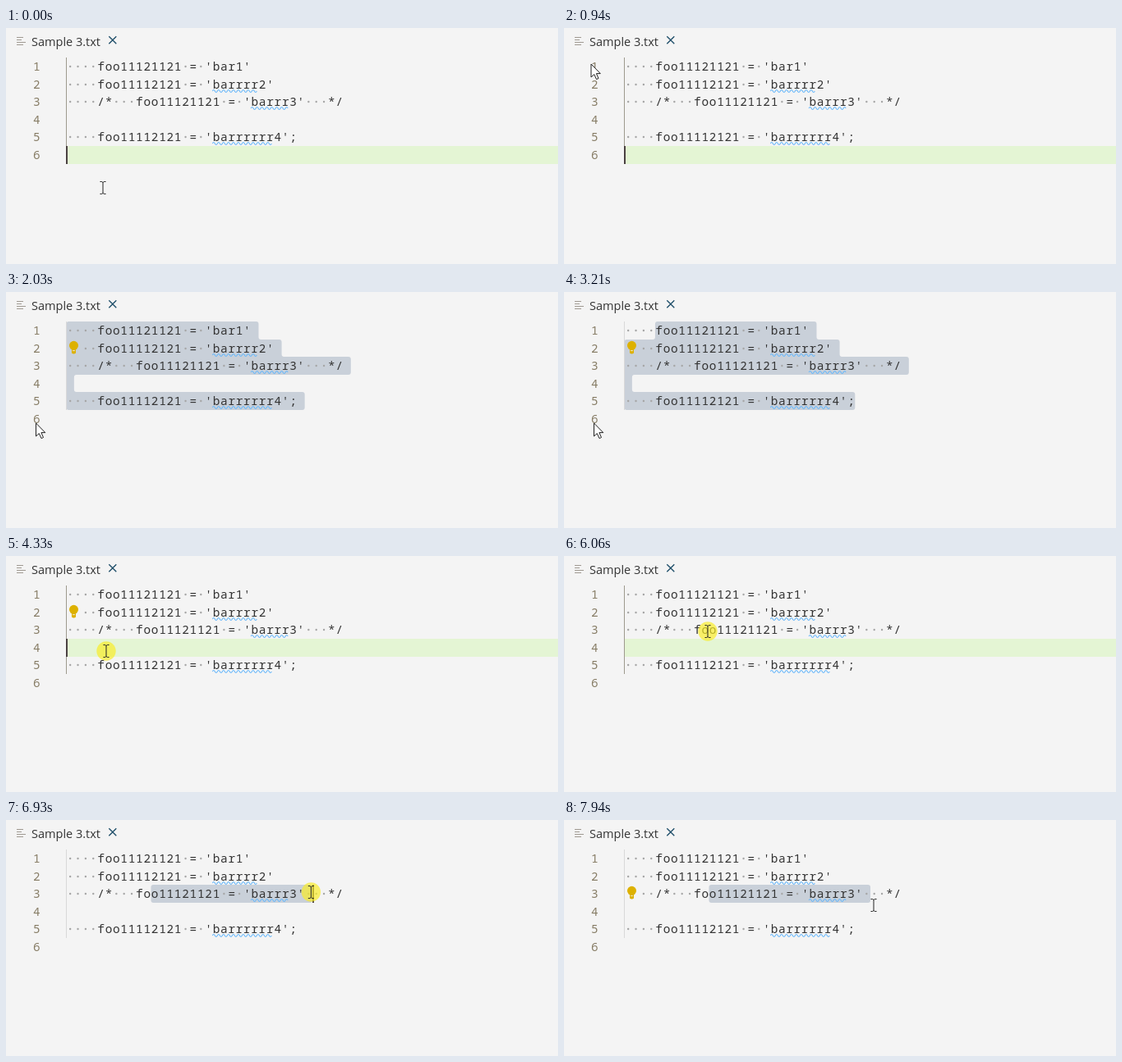
Animation, 672 px wide and 288 px high, one loop 8 s. Source, as an HTML page:

```html
<!DOCTYPE html>
<html lang="en">
<head>
<meta charset="utf-8">
<title>Editor selection</title>
<style>
  html, body { margin: 0; width: 100%; height: 100%; overflow: hidden; background: #f4f4f4; }
  svg { display: block; width: 672px; height: 288px; }
  .code { font: 14.4px "Noto Sans Mono", "DejaVu Sans Mono", monospace; letter-spacing: .72px; fill: #333; }
  .num { fill: #877d66; }
  .tab { font: 14.5px "Open Sans", "Noto Sans", sans-serif; fill: #333; }
  .dot { fill: #a6a6a6; }
  .wave { fill: none; stroke: #6cb9fa; stroke-width: 1.2; }
  .bulb { fill: #ddb100; }
</style>
</head>
<body>
<svg id="stage" viewBox="0 0 672 288">
  <path d="M13 11.5h8M13 14.5h6M13 17.5h11M13 20.5h8" stroke="#a09a92" fill="none"/>
  <text class="tab" x="31" y="22">Sample 3.txt</text>
  <path d="M125.3 10.3l9 9m0-9l-9 9" stroke="#1d4d68" stroke-width="1.3" fill="none"/>
  <rect id="active" x="73" width="599" height="22" fill="#e4f5d4"/>
  <path id="matches" fill="#e6eaed"/>
  <path id="selection" fill="#c9d0d9"/>
  <path id="guide" d="M73.5 36V144" fill="none"/>
  <g id="text"></g>
  <g id="bulb" class="bulb">
    <circle cx="82.5" cy="7.3" r="5.5"/>
    <path d="M80 11h5v5.5q-2.5 2-5 0z"/>
    <path d="M81 13.6h3" stroke="#f4f4f4" stroke-width=".8"/>
  </g>
  <rect id="caret" width="2" height="22" fill="#4a4042"/>
  <circle id="halo" r="11.7" fill="#f9ec24" fill-opacity=".68"/>
  <path id="arrow" d="M0 0V16L3.8 12.6L6.5 18.6L9 17.5L6.4 11.6H11.3Z"
        fill="#fff" stroke="#222" stroke-linejoin="round"/>
  <path id="beam" d="M-3.5 -7.5H-1.5L0 -6.5L1.5 -7.5H3.5M0 -6.5V6.5M-3.5 7.5H-1.5L0 6.5L1.5 7.5H3.5"
        fill="none" stroke="#222"/>
</svg>
<script>
const LOOP = 8000, X0 = 73.5, Y0 = 36, CW = 9.36, LH = 21.6;
const lines = [
  "    foo11121121 = 'bar1'",
  "    foo11112121 = 'barrrr2'",
  "    /*   foo11121121 = 'barrr3'   */",
  "",
  "    foo11112121 = 'barrrrrr4';",
  ""
];

// mouse moves: start, end, x, y, ease-out power
const moves = [
  [440, 940, 33, 44],
  [1190, 1340, 31.5, 133],
  [1490, 1810, 35, 148],
  [1930, 2030, 36.5, 160],
  [3720, 4260, 122, 116],
  [4540, 4970, 167, 112],
  [5080, 5360, 166, 90],
  [5560, 6000, 175, 92],
  [6225, 7400, 374, 88, 4.7],
  [7900, 7940, 377, 104]
];
const presses = [[1190, 1490], [4260, 4400], [6050, 7710]];
const bulbs = [[1720, 4570, 1], [7390, LOOP, 2]];   // from, to, row

const $ = id => document.getElementById(id);
const colX = c => X0 + c * CW;
const rowY = r => Math.round(Y0 + r * LH);
const during = (list, t) => list.find(([a, b]) => t >= a && t < b);
const show = (el, on) => el.setAttribute("visibility", on ? "visible" : "hidden");
const place = (el, x, y) => el.setAttribute("transform", `translate(${x} ${y})`);

function add(tag, attrs, content = "") {
  const el = document.createElementNS("http://www.w3.org/2000/svg", tag);
  for (const k in attrs) el.setAttribute(k, attrs[k]);
  el.textContent = content;
  $("text").append(el);
  return el;
}

function wave(from, to, y) {
  let d = `M${from} ${y}q1.5 -3 3 0`;
  for (let x = from + 6; x <= to; x += 3) d += "t3 0";
  add("path", { class: "wave", d });
}

const edgeDots = [];   // dots the light bulb covers, by row
lines.forEach((line, r) => {
  const y = rowY(r);
  add("text", { class: "code num", x: 33, y: y + 16 }, r + 1);
  for (const m of line.matchAll(/\S+/g))
    add("text", { class: "code", x: colX(m.index) + .36, y: y + 16 }, m[0]);
  const dots = [...line.matchAll(/ /g)].map(m =>
    add("circle", { class: "dot", cx: colX(m.index + .5), cy: y + 11, r: 1.2 }));
  edgeDots[r] = dots.slice(0, 2);
  const typo = /barr+/.exec(line);
  if (typo) wave(colX(typo.index), colX(typo.index + typo[0].length), y + 19);
});

function mouse(t) {
  let x = 118, y = 195;
  for (const [start, end, u, v, power = 2] of moves) {
    if (t < start) break;
    const k = 1 - (1 - Math.min(1, (t - start) / (end - start))) ** power;
    x += (u - x) * k;
    y += (v - y) * k;
  }
  return [x, y];
}

// caret and selection anchor as [row, column], and when the caret began to blink
function edit(t) {
  if (t < 1190) return { caret: [5, 0], since: -190 };
  if (t < 2750) {
    const y = mouse(Math.min(t, 1420))[1];
    return { anchor: [0, 0], caret: [Math.floor((y - Y0) / LH) + 1, 0], since: 1320 };
  }
  if (t < 4260) return { anchor: [0, 4], caret: [4, 30], since: 2710 };
  if (t < 6130) return { caret: [3, 0], since: 4260 };
  const col = Math.max(11, Math.round((mouse(t - 60)[0] - X0) / CW));
  return { anchor: col > 11 ? [2, 11] : null, caret: [2, col], since: 7250 };
}

// closed outline of stacked rows [left, right, row] with rounded corners
function outline(rows) {
  const right = [], left = [];
  for (const [l, r, row] of rows) {
    right.push([r, rowY(row)], [r, rowY(row + 1)]);
    left.unshift([l, rowY(row + 1)], [l, rowY(row)]);
  }
  const pts = [...right, ...left].filter((p, i, all) =>
    !i || p[0] !== all[i - 1][0] || p[1] !== all[i - 1][1]);
  const toward = (p, q) => {
    const len = Math.hypot(q[0] - p[0], q[1] - p[1]), k = Math.min(3, len / 2) / len;
    return `${p[0] + (q[0] - p[0]) * k} ${p[1] + (q[1] - p[1]) * k}`;
  };
  const n = pts.length;
  return pts.map((p, i) =>
    `${i ? "L" : "M"}${toward(p, pts[(i + n - 1) % n])}Q${p[0]} ${p[1]} ${toward(p, pts[(i + 1) % n])}`
  ).join("") + "Z";
}

function selectionPath([r0, c0], [r1, c1]) {
  const rows = [];
  for (let r = r0; r <= r1; r++) {
    const from = r === r0 ? c0 : 0, to = r === r1 ? c1 : lines[r].length + 1;
    if (to > from) rows.push([colX(from), colX(to), r]);
  }
  return outline(rows);
}

function matchPath([row, from], [, to]) {
  const word = lines[row].slice(from, to);
  return lines.map((line, r) => {
    const c = r === row ? -1 : line.indexOf(word);
    return c < 0 ? "" : outline([[colX(c), colX(c + word.length), r]]);
  }).join("");
}

function draw(t) {
  const { anchor, caret, since } = edit(t), [x, y] = mouse(t);

  $("selection").setAttribute("d", anchor ? selectionPath(anchor, caret) : "");
  const oneLine = anchor && anchor[0] === caret[0] && caret[1] - anchor[1] > 1;
  $("matches").setAttribute("d", oneLine ? matchPath(anchor, caret) : "");
  show($("active"), !anchor);
  $("active").setAttribute("y", rowY(caret[0]));
  $("guide").setAttribute("stroke", anchor ? "#d9d9d9" : "#9e9a8e");

  show($("caret"), Math.floor(Math.max(0, t - since) / 500) % 2 === 0);
  place($("caret"), Math.floor(colX(caret[1])), rowY(caret[0]));

  const bulb = during(bulbs, t);
  show($("bulb"), bulb);
  if (bulb) place($("bulb"), 0, rowY(bulb[2]));
  edgeDots.forEach((dots, r) => dots.forEach(d => show(d, !bulb || bulb[2] !== r)));

  show($("halo"), during(presses, t));
  show($("arrow"), x < 66);
  show($("beam"), x >= 66);
  for (const id of ["halo", "arrow", "beam"]) place($(id), x, y);
}

function tick() {
  draw(performance.now() % LOOP);
  requestAnimationFrame(tick);
}
tick();
</script>
</body>
</html>
```
